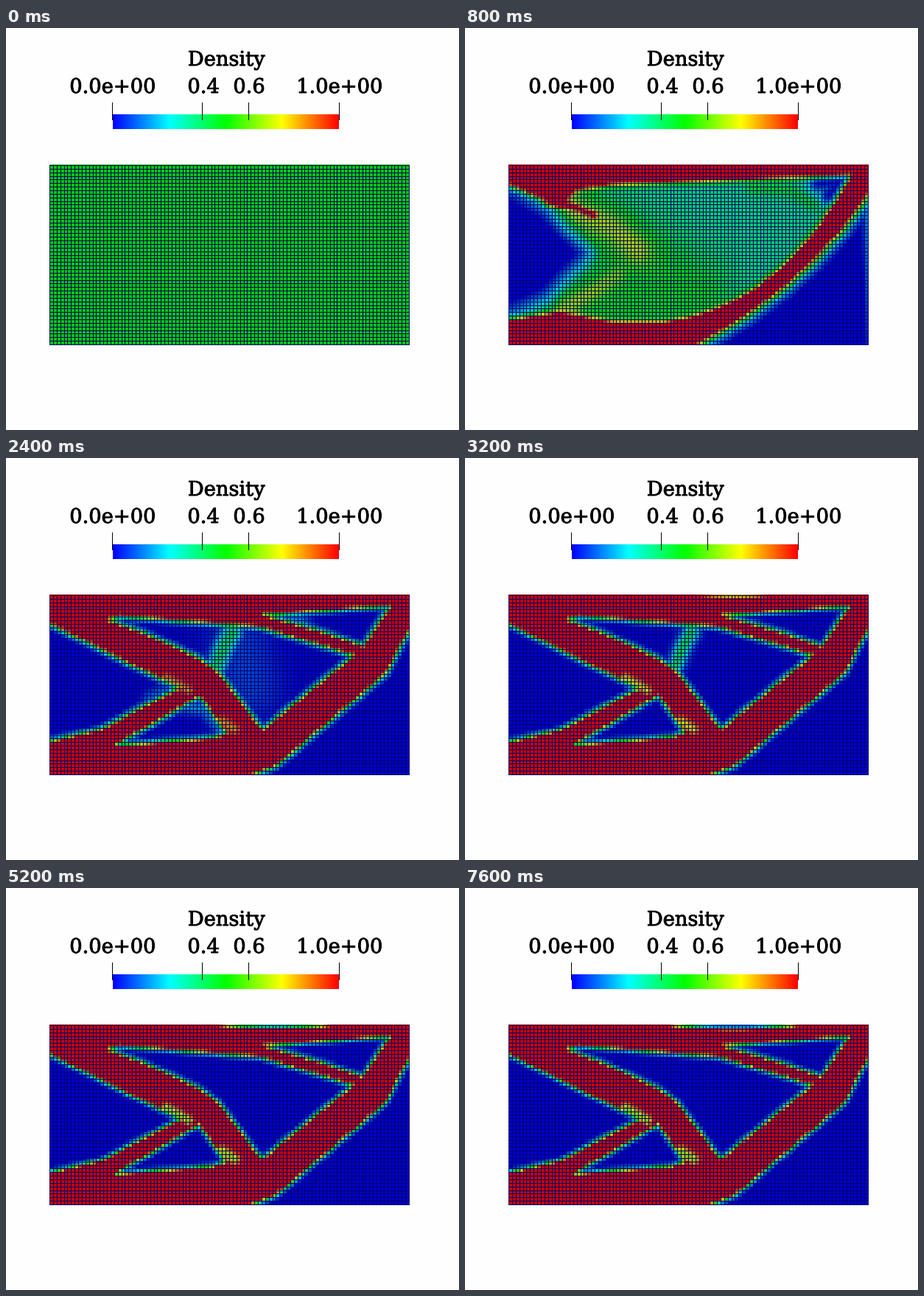
A matplotlib script for the animation above (8 s loop, 615 by 545 pixels).

```python
import numpy as np
import matplotlib.pyplot as plt
from matplotlib.animation import FuncAnimation
from matplotlib.collections import LineCollection
from matplotlib.colors import LinearSegmentedColormap
from matplotlib.patheffects import withStroke

W, H, DPI = 615, 545, 100
PX = 72 / DPI
STEP, FRAMES = 400, 20
FORMED, CLEAR = 800, 1600          # ms: first shape, first clear truss
NX, NY = 100, 50
LEFT, TOP, WIDTH, HEIGHT = 59, 185, 488, 243

GX, GY = np.meshgrid(LEFT + 0.5 + (np.arange(NX) + 0.5) * WIDTH / NX,
                     TOP + 0.5 + (np.arange(NY) + 0.5) * HEIGHT / NY)


def rainbow(level):
    stops = np.array([(0, 0, 1), (0, 1, 1), (0, 1, 0), (1, 1, 0), (1, 0, 0)])
    return LinearSegmentedColormap.from_list("rainbow", stops * level, N=512)


def bend(start, control, end, n=10):
    """Points on a quadratic curve."""
    a, c, b = map(np.array, (start, control, end))
    u = np.linspace(0, 1, n)[:, None]
    return [*((1 - u) ** 2 * a + 2 * u * (1 - u) * c + u ** 2 * b)]


def segment_distance(a, b):
    dx, dy = b[0] - a[0], b[1] - a[1]
    u = np.clip(((GX - a[0]) * dx + (GY - a[1]) * dy) / (dx * dx + dy * dy), 0, 1)
    return np.hypot(GX - a[0] - u * dx, GY - a[1] - u * dy)


def depth(points):
    """Signed distance to a polygon's outline, positive inside."""
    dist = np.full(GX.shape, 1e9)
    inside = np.zeros(GX.shape, bool)
    for a, b in zip(points, np.roll(points, -1, axis=0)):
        dist = np.minimum(dist, segment_distance(a, b))
        if a[1] != b[1]:
            crossing = a[0] + (GY - a[1]) * (b[0] - a[0]) / (b[1] - a[1])
            inside ^= ((a[1] > GY) != (b[1] > GY)) & (GX < crossing)
    return np.where(inside, dist, -dist)


def wall(dist, soft):
    """Density falling from solid to empty across a hole's outline."""
    return np.interp(dist / soft, [-2.5, 0, 3, 8], [1, 0.6, 0.2, 0])


def ridge(width, *points):
    dist = np.min([segment_distance(a, b) for a, b in zip(points, points[1:])], axis=0)
    return np.exp(-(dist / width) ** 2)


# Each hole of the truss: settled outline, early shift.
HOLES = [
    ([(40, 216), (236, 313), (130, 369), (40, 390)], (-4, -3)),
    ([(320, 433), (366, 416), (515, 291), (552, 222), (560, 445)], (2, 1)),
    ([(147, 387), (262, 320), (298, 371), (280, 377)], (2, 4)),
    ([(137, 219), (153, 214), (345, 229), (471, 267), (347, 367),
      (288, 290), (262, 271), (185, 236)], (2, 1)),
    ([(348, 214), (521, 201), (484, 256), (430, 237)], (2, -2)),
]


def forming(soft):
    """Blurry first shape: an arch, a grey web and two empty corners."""
    arch = bend((524, 199), (425, 380), (270, 397))
    web = [(50, 209), (130, 243), (152, 220), (200, 213), *arch,
           (200, 397), (128, 384), (50, 396)]
    wedge = [(40, 208), (110, 248), (166, 305), (110, 362), (40, 394)]
    corner = bend((318, 429), (468, 350), (552, 222)) + [(560, 445), (318, 445)]

    fill = 0.36 + 0.15 * ridge(55, (150, 265), (220, 300), (310, 360), (160, 375))
    fill += 0.20 * ridge(22, (150, 245), (200, 268), (235, 300))
    fill += 0.18 * ridge(13, (135, 379), (170, 358), (205, 335))
    fill += 0.10 * ridge(10, (390, 218), (440, 220), (475, 240))
    fill *= 1 - 0.95 * ridge(14, (480, 210), (510, 208), (495, 226))
    fill *= np.clip(0.4 - depth(wedge) / 32, 0, 1)
    fill = np.maximum(fill, ridge(11, (115, 233), (150, 243), (175, 254)))

    rho = fill + (1 - fill) * wall(depth(web), soft)
    return np.minimum(rho, wall(depth(corner), 2 * soft))


def truss(t):
    """Clear layout: the holes drift into place and a notch opens on top."""
    early = np.exp((CLEAR - t) / 1200)
    soft = 0.9 + 0.35 * early
    sag = 10 * (1 - np.exp((CLEAR - t) / 2400)) + 0.01
    half = 60 + 6 * sag
    notch = bend((365 - half, 182), (365, 182 + 2 * sag), (365 + half, 182))

    rho = wall(depth(notch), soft)
    for outline, shift in HOLES:
        rho = np.minimum(rho, wall(depth(outline + early * np.array(shift)), soft))

    strut = 0.42 * np.clip((5200 - t) / 2000, 0, 1)
    rho = np.maximum(rho, strut * ridge(8 + 12 * early, (307, 236), (296, 256), (286, 280)))
    haze = max(0, 1 - (t - CLEAR) / 1400)
    for amount, spread, *path in [(0.42, 14, (300, 218), (400, 224)),
                                  (0.2, 45, (315, 250), (330, 310)),
                                  (0.4, 10, (235, 335), (270, 340), (290, 365)),
                                  (0.3, 10, (195, 325), (225, 310))]:
        rho = np.maximum(rho, amount * haze * ridge(spread, *path))

    worn = 0.35 * (1 - early)
    rho -= worn * (ridge(6, (218, 298), (248, 314)) + ridge(7, (294, 356), (310, 367)))
    return np.clip(rho, 0, 1)


def density(t):
    if t < FORMED:
        return 0.5 + 1.3 * t / FORMED * (forming(2.5) - 0.5)
    if t < CLEAR:
        u = (t - FORMED) / (CLEAR - FORMED)
        return (1 - u) * forming(1) + u * truss(CLEAR)
    return truss(t)


fig = plt.figure(figsize=(W / DPI, H / DPI), dpi=DPI, facecolor="#fefefe")
ax = fig.add_axes([0, 0, 1, 1])
ax.axis("off")

ax.imshow(np.linspace(0, 1, 307)[None], cmap=rainbow(1), aspect="auto",
          extent=(145, 452, 137, 117), interpolation="nearest")
mesh = ax.imshow(density(0), cmap=rainbow(0.79), vmin=0, vmax=1, aspect="auto",
                 extent=(LEFT, LEFT + WIDTH + 1, TOP + HEIGHT + 1, TOP),
                 interpolation="nearest")

# Lines snap to whole pixels; with y pointing down that needs one pixel more.
right, upper, lower = LEFT + WIDTH, TOP + 1, TOP + HEIGHT + 1
columns = [[(x, upper), (x, lower)] for x in np.linspace(LEFT, right, NX + 1)]
rows = [[(LEFT, y), (right, y)] for y in np.linspace(upper, lower, NY + 1)]
ax.add_collection(LineCollection(columns + rows, colors=[(0, 0, 0.42)],
                                 linewidths=PX, antialiaseds=False))


def write(x, y, label):
    ax.text(x, y, label, family="DejaVu Serif", size=27.3 * PX, ha="center",
            va="baseline", color="black",
            path_effects=[withStroke(linewidth=0.9 * PX, foreground="black")])


write(299, 51, "Density")
for tick, x, label in [(144, 144.5, "0.0e+00"), (266, 268, "0.4"),
                       (329, 330, "0.6"), (452, 452.5, "1.0e+00")]:
    ax.plot([tick, tick], [101, 124], color="black", lw=PX, antialiased=False)
    write(x, 88, label)

ax.set_xlim(0, W)
ax.set_ylim(H, 0)


def update(n):
    mesh.set_data(density(n * STEP))
    return [mesh]


anim = FuncAnimation(fig, update, frames=FRAMES, interval=STEP,
                     repeat=True, repeat_delay=0, blit=False)
plt.show()
```
